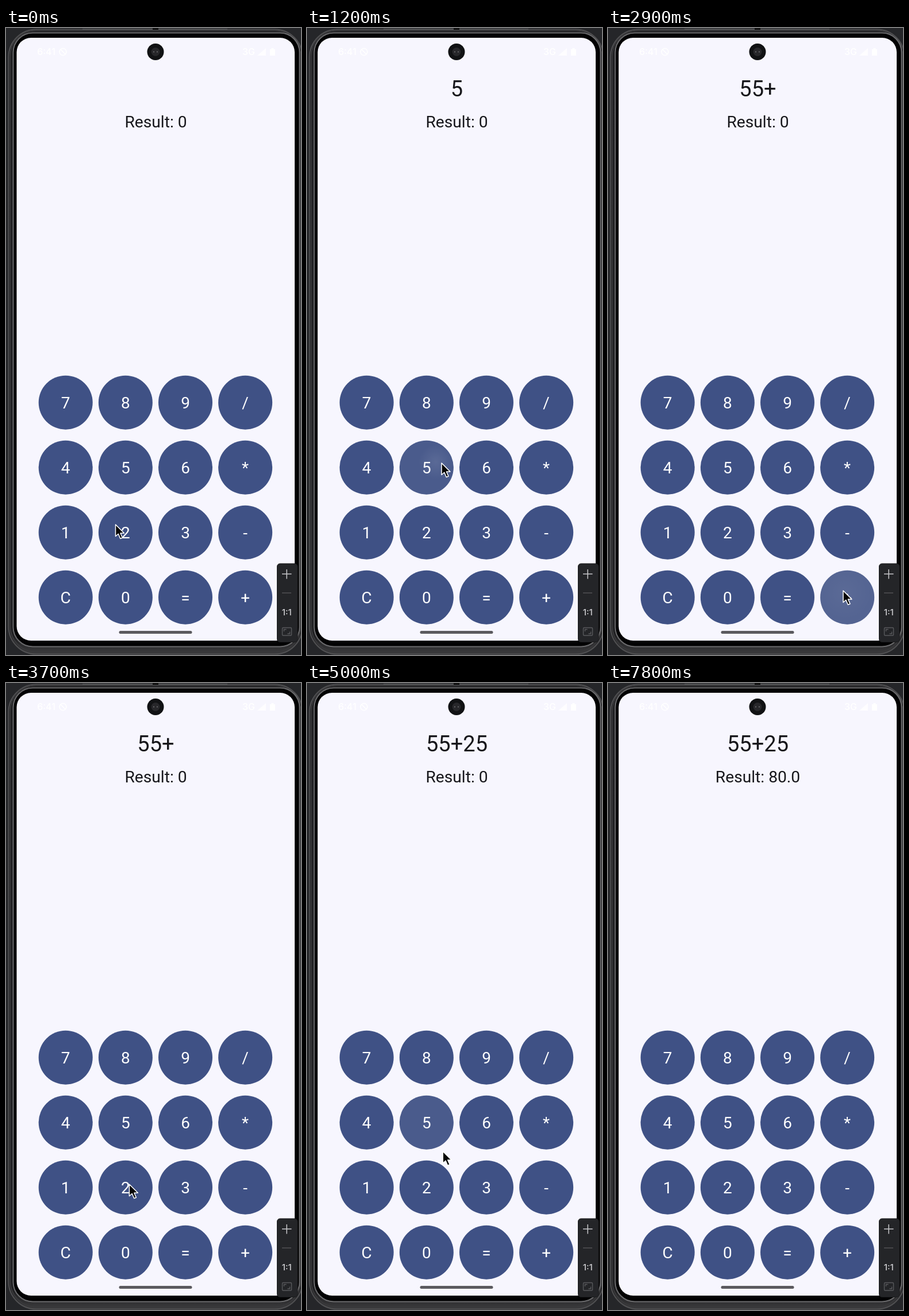
An HTML page that plays this animation: 513x1091 px, repeating every 7.9 s.

```html
<!DOCTYPE html>
<html lang="en">
<head>
<meta charset="utf-8">
<title>Calculator</title>
<style>
  html, body { margin: 0; width: 100%; height: 100%; overflow: hidden; background: #252629; }
  svg { display: block; width: 100vw; height: 100vh; }
  text { font-family: Roboto, sans-serif; text-anchor: middle; }
  .display { fill: #17171b; }
  .label { fill: #fff; font-size: 28px; }
  .status text { fill: #fff; font: 500 16px Inter, sans-serif; }
</style>
</head>
<body>
<svg viewBox="0 0 513 1091" preserveAspectRatio="none">
  <defs>
    <linearGradient id="metal" x2="0" y2="1">
      <stop offset="0" stop-color="#1d1d1f"/>
      <stop offset=".97" stop-color="#1f1f21"/>
      <stop offset="1" stop-color="#3b3b3d"/>
    </linearGradient>
    <radialGradient id="glow">
      <stop offset="0" stop-color="#fff"/>
      <stop offset="1" stop-color="#fff" stop-opacity="0"/>
    </radialGradient>
    <clipPath id="keyClip"><circle id="clipCircle" r="47"/></clipPath>
  </defs>

  <!-- phone body -->
  <rect width="513" height="1091" fill="#252629"/>
  <rect x="4.5" y="2.5" width="511" height="1087" rx="48" fill="url(#metal)" stroke="#505052" stroke-width="2"/>
  <path d="M133 2h252" stroke="#6a6a6c"/>
  <path d="M255 0h10v3h-10z" fill="#111"/>
  <rect x="7.5" y="4.5" width="505" height="1081" rx="44" fill="none" stroke="#39393b" stroke-width="2"/>
  <rect x="12.5" y="8.5" width="498" height="1068" rx="34" fill="#020203" stroke="#6b6b6d" stroke-width="2"/>
  <rect x="18.5" y="17" width="483.5" height="1049" rx="25" fill="#f7f6fe"/>

  <g class="status" fill="#fff">
    <text x="70" y="47">6:41</text>
    <g fill="none" stroke="#fff" stroke-width="1.6">
      <circle cx="99" cy="41.500" r="6"/><path d="M94.500 37l9 9"/>
    </g>
    <text x="422" y="47">3G</text>
    <path d="M437 48L452 35V48z" opacity=".8"/>
    <path d="M459 37h2.500v-2h4v2h2.500v11h-9z"/>
  </g>
  <circle cx="260" cy="41.500" r="14.500" fill="#111214"/>
  <circle cx="260" cy="41.500" r="7.500" fill="#27272a"/>
  <g fill="#77777a"><circle cx="257" cy="41.500" r="1"/><circle cx="263" cy="41.500" r="1"/></g>

  <text class="display" id="expression" x="260.500" y="118.500" font-size="38"></text>
  <text class="display" id="result" x="260.500" y="172.500" font-size="28.200"></text>

  <g id="discs" fill="#3f5185"></g>
  <g clip-path="url(#keyClip)">
    <circle id="ripple" r="47" fill="#fff"/>
    <circle id="spot" fill="url(#glow)"/>
  </g>
  <g id="labels"></g>
  <rect x="196.500" y="1049" width="127" height="5" rx="2.500" fill="#5b5a5f"/>

  <!-- zoom panel -->
  <rect x="471.500" y="932" width="35.500" height="136.500" rx="5" fill="#242528" stroke="#1a1b1d"/>
  <path d="M480 950h16.500M488.200 942v16.500" stroke="#c8c8cb" stroke-width="1.500"/>
  <path d="M480 983h16" stroke="#58595c" stroke-width="1.300"/>
  <text x="488.200" y="1022" fill="#cfcfd2" style="font:500 15px Inter, sans-serif">1:1</text>
  <g fill="none" stroke="#58595c" stroke-width="1.400">
    <rect x="480.500" y="1043.500" width="16" height="13.500" rx="1.500"/>
    <path d="M483.500 1050v-3.500h4M493.500 1050.500v3.500h-4"/>
  </g>

  <path id="cursor" d="M0 0V20.500L4.800 16.300L8.300 24.500L12 23L8.500 15H15z"
        fill="#050505" stroke="#fff" stroke-width="1.500" stroke-linejoin="round"/>
</svg>
<script>
const LOOP = 7900, STEP = 100;
const get = id => document.getElementById(id);
const set = (el, attrs) => Object.entries(attrs).forEach(([k, v]) => el.setAttribute(k, v));
const add = (parent, tag, attrs, text = '') => {
  const el = document.createElementNS('http://www.w3.org/2000/svg', tag);
  set(el, attrs);
  el.textContent = text;
  parent.append(el);
};

const keys = {};
[...'789/456*123-C0=+'].forEach((char, i) => {
  const x = 103.7 + (i % 4) * 104.15, y = 651.7 + Math.floor(i / 4) * 113;
  keys[char] = { x, y };
  add(get('discs'), 'circle', { cx: x, cy: y, r: 47 });
  add(get('labels'), 'text', { class: 'label', x, y: y + 10 }, char);
});

// Each press: time, key, and where the touch lands
const presses = [
  { at: 1100, key: '5', x: 224, y: 755 },
  { at: 1500, key: '5', x: 224, y: 755 },
  { at: 2700, key: '+', x: 412, y: 982 },
  { at: 4000, key: '2', x: 207, y: 878 },
  { at: 4600, key: '5', x: 212, y: 762 },
  { at: 5500, key: '=', x: 308, y: 976 }
];

// Pointer path: time, x, y
const path = [
  [0, 190.5, 864], [100, 187, 808], [200, 187, 808], [300, 205, 758], [450, 248, 722],
  [600, 234, 757], [1600, 234, 757], [2000, 322, 967], [2400, 409, 979], [3100, 409, 979],
  [3800, 203, 866], [4000, 203, 866], [4200, 202.5, 808], [4500, 212, 760], [4800, 212, 760],
  [5400, 305.5, 972], [LOOP, 305.5, 972]
];
const HIDE_AT = 7400;

const smooth = u => u * u * (3 - 2 * u);

function pointerAt(t) {
  const i = path.findIndex(p => p[0] > t);
  const [t0, x0, y0] = path[i - 1], [t1, x1, y1] = path[i];
  const u = smooth((t - t0) / (t1 - t0));
  return [x0 + (x1 - x0) * u, y0 + (y1 - y0) * u];
}

function drawRipple(t) {
  const press = presses.findLast(p => p.at <= t);
  const age = press ? t - press.at : LOOP;
  const level = Math.max(0, Math.min(age / 200, 1, (500 - age) / 200));
  const { x, y } = keys[press ? press.key : '5'];
  set(get('clipCircle'), { cx: x, cy: y });
  set(get('ripple'), { cx: x, cy: y, opacity: 0.11 * level });
  set(get('spot'), {
    cx: press ? press.x : x, cy: press ? press.y : y,
    r: 12 + age * 0.18,
    opacity: level * Math.max(0, 0.32 - age * 0.0014)
  });
}

function draw(now) {
  const t = Math.floor((now % LOOP) / STEP) * STEP;
  const done = presses.filter(p => p.at + 100 <= t).map(p => p.key).join('');
  get('expression').textContent = done.replace('=', '');
  get('result').textContent = 'Result: ' + (done.endsWith('=') ? '80.0' : '0');
  drawRipple(t);
  set(get('cursor'), {
    transform: `translate(${pointerAt(t)})`,
    visibility: t < HIDE_AT ? 'visible' : 'hidden'
  });
}

let start;
function tick(now) {
  start ??= now;
  draw(now - start);
  requestAnimationFrame(tick);
}
draw(0);
requestAnimationFrame(tick);
</script>
</body>
</html>
```
